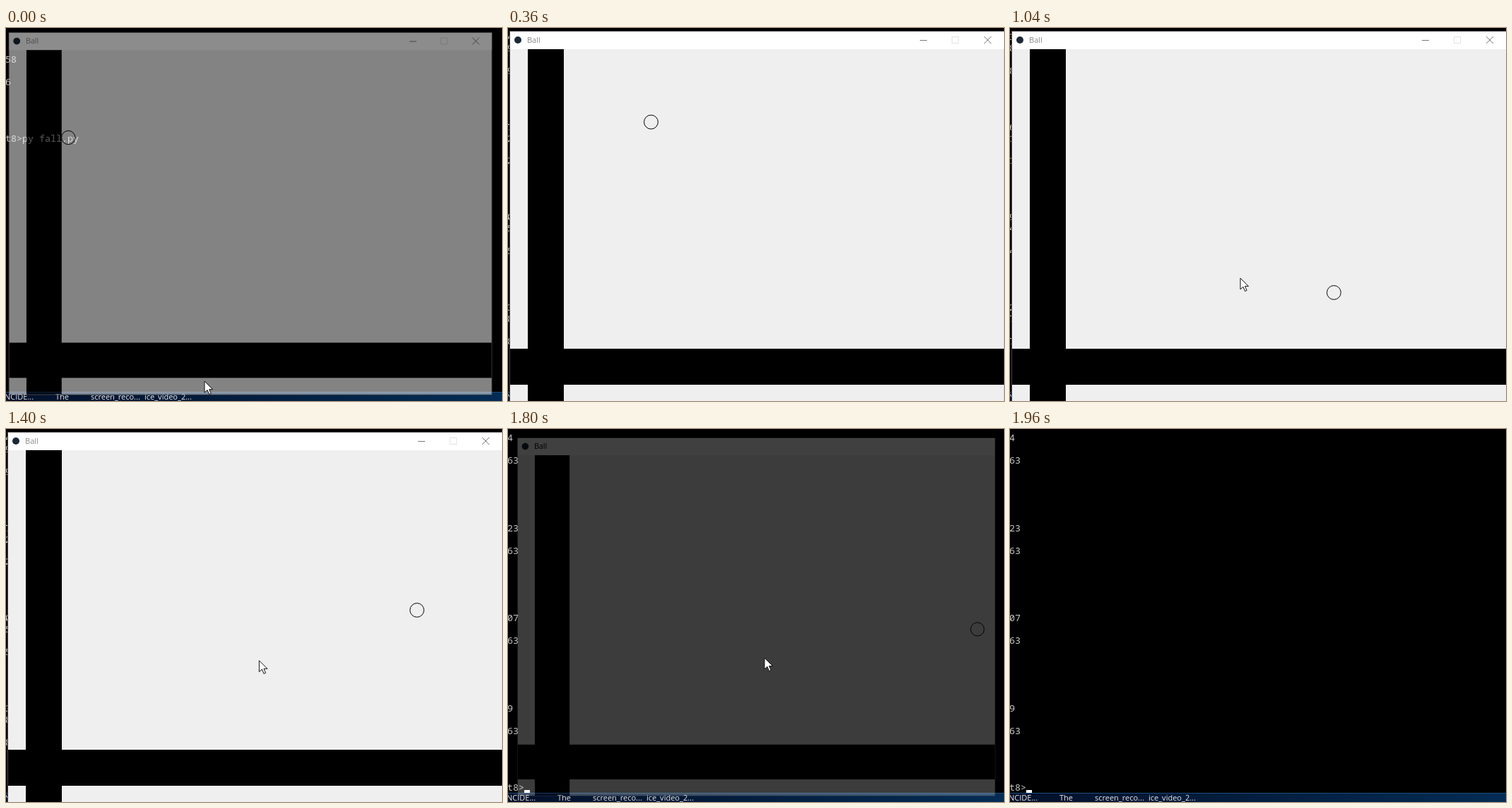
These frames come from a looping animation (702 px wide and 528 px high, 2000 ms). An HTML page:

```html
<!DOCTYPE html>
<html lang="en">
<head>
<meta charset="utf-8">
<title>Ball</title>
<style>
  html, body { margin: 0; width: 702px; height: 528px; overflow: hidden; background: #000; }
  svg { display: block; }
  text { white-space: pre; }
  .mono { font: 13.33px "Noto Sans Mono", "DejaVu Sans Mono", monospace; fill: #c8c8c8; }
  .ui { font: 11px "Open Sans", "Noto Sans", sans-serif; }
</style>
</head>
<body>
<svg width="702" height="528" viewBox="0 0 702 528">
  <defs>
    <linearGradient id="navy">
      <stop offset="0" stop-color="#03102a"/>
      <stop offset="1" stop-color="#042c54"/>
    </linearGradient>
  </defs>
  <rect width="702" height="528"/>
  <g id="console" class="mono"></g>
  <rect id="caret" x="23" y="511" width="8" height="4" fill="#fff"/>
  <g class="ui" fill="#e8e8e8">
    <rect y="515" width="702" height="13" fill="url(#navy)"/>
    <rect y="515" width="702" height="1" fill="#1d4d7c"/>
    <text x="-2" y="526">NCIDE...</text>
    <text x="70" y="526">The</text>
    <text x="120" y="526">screen_reco...</text>
    <text x="196" y="526">ice_video_2...</text>
  </g>
  <g id="win">
    <rect x="2.5" y="4.5" width="700" height="525" fill="#efefef" stroke="#444"/>
    <rect x="3" y="5" width="699" height="25" fill="#fff"/>
    <circle cx="14" cy="17" r="5" fill="#1b2838"/>
    <text id="title" class="ui" x="27" y="21">Ball</text>
    <g id="buttons" fill="none">
      <path d="M583 17.5h10M674 12l10 10M684 12l-10 10"/>
      <rect x="628.5" y="12.5" width="9" height="9" stroke="#e2e2e2"/>
    </g>
    <rect x="28" y="30" width="51" height="499"/>
    <rect x="3" y="454" width="699" height="51"/>
    <circle id="ball" r="9.9" fill="none" stroke="#000"/>
  </g>
  <path id="cursor" d="M0 0V16L4 12.4 6.6 18.6 9.2 17.4 6.6 11.6H11.6Z" fill="#fff" stroke="#111"/>
</svg>
<script>
const LOOP = 2000, STEP = 40;
const RUN = 40, ACTIVATE = 1480, STOP = 1680, CLOSE = 1720;
const FADE = 160;

// Anchor point and amount of shrinking while the window fades.
const opening = { x: 68, y: 83, shrink: .051 };
const closing = { x: 320, y: 240, shrink: .0453 };

const $ = id => document.getElementById(id);
const set = (id, attrs) => {
  for (const name in attrs) $(id).setAttribute(name, attrs[name]);
};
const show = on => on ? "visible" : "hidden";
const progress = (t, from, to) => Math.min(1, Math.max(0, (t - from) / (to - from)));
const smooth = (t, from, to) => {
  const u = progress(t, from, to);
  return u * u * (3 - 2 * u);
};

// Simulation steps: slow at first, then catching up until the stop.
function stepsAt(t) {
  const u = progress(t, 0, STOP);
  return Math.round(62 * u - .9 * Math.sin(2 * Math.PI * u));
}

// Two parabolas meet where the ball hits the floor.
const arc = (n, apex, top) => top + .519 * (n - apex) ** 2;

function drawBall(n) {
  set("ball", {
    cx: 88.7 + 9.48 * n,
    cy: Math.min(arc(n, 7.9, 124.4), arc(n, 54.25, 253.8))
  });
}

function drawWindow(t) {
  const isClosing = t >= CLOSE;
  const { x, y, shrink } = isClosing ? closing : opening;
  const hidden = isClosing
    ? 1 - (1 - progress(t, CLOSE, CLOSE + FADE)) ** 2
    : .452 * Math.exp(-t / 66);
  const active = t >= ACTIVATE;
  set("win", {
    opacity: 1 - hidden,
    transform: `translate(${x} ${y}) scale(${1 - shrink * hidden}) translate(${-x} ${-y})`
  });
  set("title", { fill: active ? "#000" : "#8a8a8a" });
  set("buttons", { stroke: active ? "#111" : "#777", visibility: show(!isClosing) });
}

function drawCursor(t) {
  const rest = smooth(t, 1120, ACTIVATE);
  const x = 281 + 45 * smooth(t, 240, 840) + 37 * rest;
  const y = 500 + 32 * smooth(t, 100, 240) - 178 * smooth(t, 400, 760) - 30 * rest;
  set("cursor", {
    transform: `translate(${x} ${y})`,
    visibility: show(t < CLOSE + FADE)
  });
}

// Each line is a console row number and its text.
function consoleLines(t, n) {
  if (t < RUN) return [[2, "58"], [4, "6"], [9, "t8&gt;py fall.py"]];
  const blocks = ["4", "23", "07", "9"];
  if (t >= STOP) {
    return [
      ...blocks.flatMap((s, i) => [[8 * i, s], [8 * i + 2, "63"]]),
      [31, "t8&gt;"]
    ];
  }
  return blocks.flatMap((_, i) =>
    [0, 1, 3].map(row => [8 * i + row, (n * 7 + i * 3 + row * 5) % 10]));
}

function drawConsole(t, n) {
  $("console").innerHTML = consoleLines(t, n)
    .map(([row, s]) => `<text x="-1" y="${Math.round(16.8 + row * 15.97)}">${s}</text>`)
    .join("");
  set("caret", { visibility: show(t >= STOP) });
}

function draw(t) {
  const n = stepsAt(t);
  drawBall(n);
  drawWindow(t);
  drawCursor(t);
  drawConsole(t, n);
}

const start = performance.now();
let last = -1;
function tick() {
  const t = Math.floor((performance.now() - start) % LOOP / STEP) * STEP;
  if (t !== last) draw(last = t);
  requestAnimationFrame(tick);
}
tick();
</script>
</body>
</html>
```
